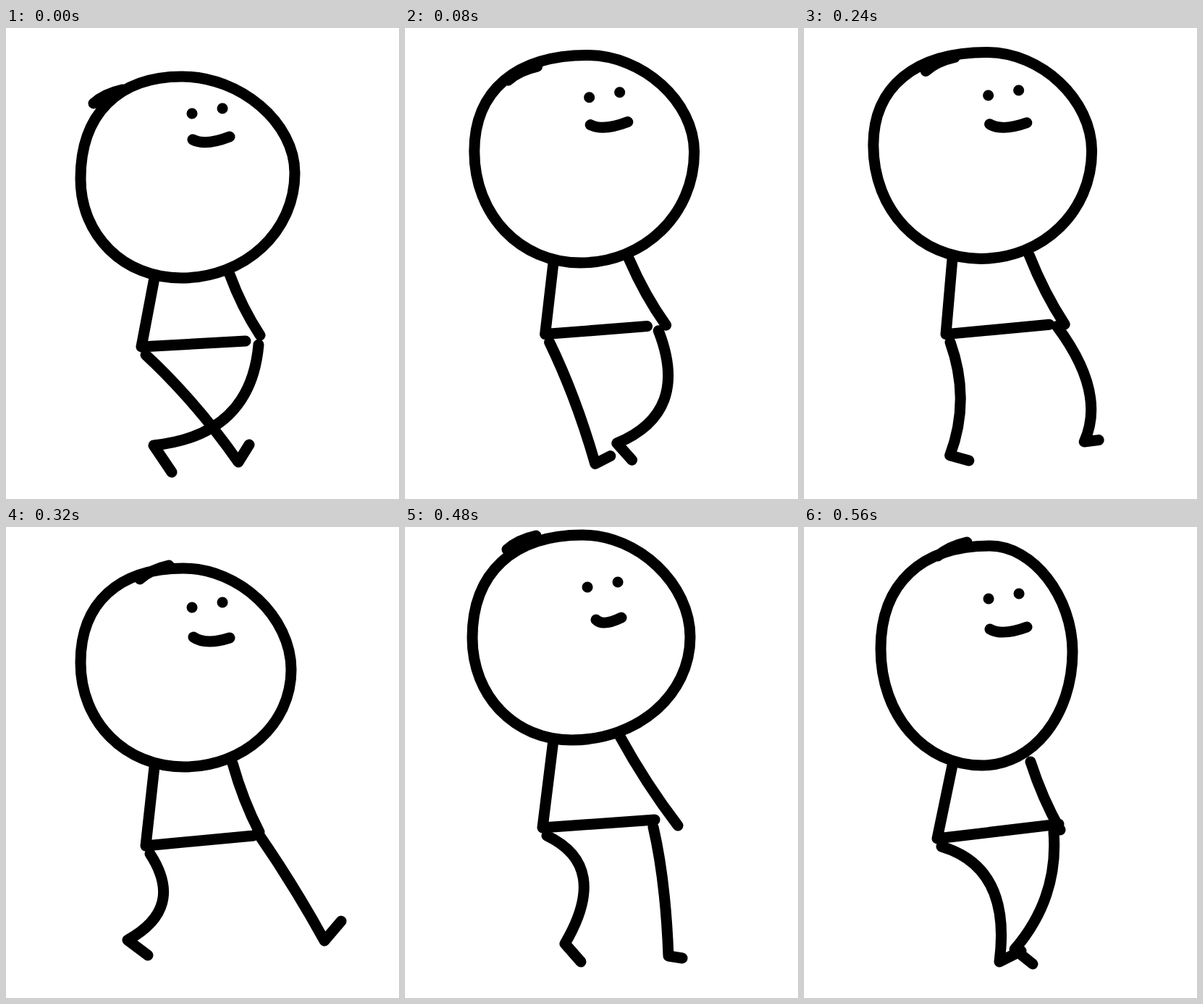
Animation, 543 px wide and 650 px high, one loop 640 ms. Source, as an HTML page:

```html
<!DOCTYPE html>
<html lang="en">
<head>
<meta charset="utf-8">
<title>Walking figure</title>
<style>
  html, body { margin: 0; width: 100%; height: 100%; overflow: hidden; background: #fff; }
  svg { display: block; width: 100%; height: 100%; }
  path { fill: none; stroke: #000; stroke-width: 15; stroke-linecap: round; stroke-linejoin: round; }
</style>
</head>
<body>
<svg viewBox="0 0 543 650"><path id="figure"/></svg>
<script>
const STEP = 80;

// How full the head is in each quarter, clockwise from the top.
const ROUNDNESS = [0.52, 0.56, 0.57, 0.63];

// Key points of a pose:
// head: top, right, bottom, left; tuft: outer end; face: eye, mouth ends;
// torso: hip, belt end, hand; left: knee, ankle, toe; right: hip, knee, ankle, toe.
const cross = {
  head: '243,67 399,200 242,345 103,208', tuft: '121,104',
  face: '257,118 258,154 309,150', torso: '187,440 331,432 351,424',
  left: '262,515 321,599 336,575', right: '349,437 338,562 204,576 229,613'
};
const stand = {
  head: '258,18 400,152 243,310 91,145', tuft: '157,51',
  face: '253,81 255,120 307,116', torso: '198,411 337,398 367,401',
  left: '219,505 224,603 249,601', right: '351,405 432,510 352,571 370,585'
};
const stride = {
  head: '245,57 394,197 246,331 103,187', tuft: '185,72',
  face: '257,111 259,152 309,153', torso: '193,440 342,426 350,421',
  left: '248,526 168,570 196,591', right: '347,421 397,493 440,571 463,544'
};
const land = {
  head: '253,17 389,183 253,314 118,165', tuft: '172,42',
  face: '254,97 259,141 300,136', torso: '184,435 367,414 367,427',
  left: '268,472 203,572 227,596', right: '357,424 379,505 401,589 421,564'
};
const lift = {
  head: '245,11 394,152 230,294 93,153', tuft: '141,31',
  face: '252,83 264,128 299,125', torso: '190,415 345,404 377,412',
  left: '284,468 221,575 243,600', right: '343,414 360,487 364,592 383,595'
};
const pass = {
  head: '257,26 371,172 246,329 106,168', tuft: '185,40',
  face: '255,99 257,141 308,138', torso: '184,430 352,410 354,418',
  left: '287,470 270,600 300,585', right: '345,421 352,512 291,583 316,603'
};

const points = text => text.split(' ').map(pair => pair.split(',').map(Number));
const mix = (p, q, k) => p.map((v, i) => v + (q[i] - v) * k);
const shift = ([x, y], dx, dy) => [x + dx, y + dy];

const blend = (a, b, k) => Object.fromEntries(Object.keys(a).map(part => {
  const end = points(b[part]);
  return [part, points(a[part]).map((p, i) => mix(p, end[i], k)).join(' ')];
}));

const line = (...pts) => 'M' + pts.join('L');
const dot = p => `M${p}h.1`;
const bend = (from, control, to) => `M${from}Q${control} ${to}`;
const bow = (from, to, dx, dy) => bend(from, shift(mix(from, to, 0.5), dx, dy), to);
const leg = (hip, knee, ankle, toe) => bend(hip, knee, ankle) + 'L' + toe;

// A rounded outline, level at top and bottom and upright at the sides.
function egg(tips) {
  const arcs = tips.map((p, i) => {
    const q = tips[(i + 1) % 4];
    const corner = i % 2 ? [p[0], q[1]] : [q[0], p[1]];
    return `C${mix(p, corner, ROUNDNESS[i])} ${mix(q, corner, ROUNDNESS[i])} ${q}`;
  });
  return 'M' + tips[0] + arcs.join('') + 'Z';
}

function draw(pose) {
  const tips = points(pose.head);
  const [tuft] = points(pose.tuft);
  const [eye, mouthStart, mouthEnd] = points(pose.face);
  const [hip, belt, hand] = points(pose.torso);
  const chin = tips[2];
  return [
    egg(tips),
    bow(tuft, shift(tuft, 40, -19), -5, -4),
    dot(eye), dot(shift(eye, 42, -7)),
    bow(mouthStart, mouthEnd, -8, 11),
    line([205, chin[1]], hip, belt),
    bow(shift(chin, 67, -5), hand, -4, 4),
    leg(shift(hip, 6, 11), ...points(pose.left)),
    leg(...points(pose.right))
  ].join('');
}

const steps = [
  cross, blend(cross, stand, 0.6), stand, blend(stand, stride, 0.4),
  stride, land, lift, pass
].map(draw);

const figure = document.getElementById('figure');
const start = performance.now();
function tick() {
  const step = Math.floor((performance.now() - start) / STEP) % steps.length;
  figure.setAttribute('d', steps[step]);
  requestAnimationFrame(tick);
}
tick();
</script>
</body>
</html>
```
